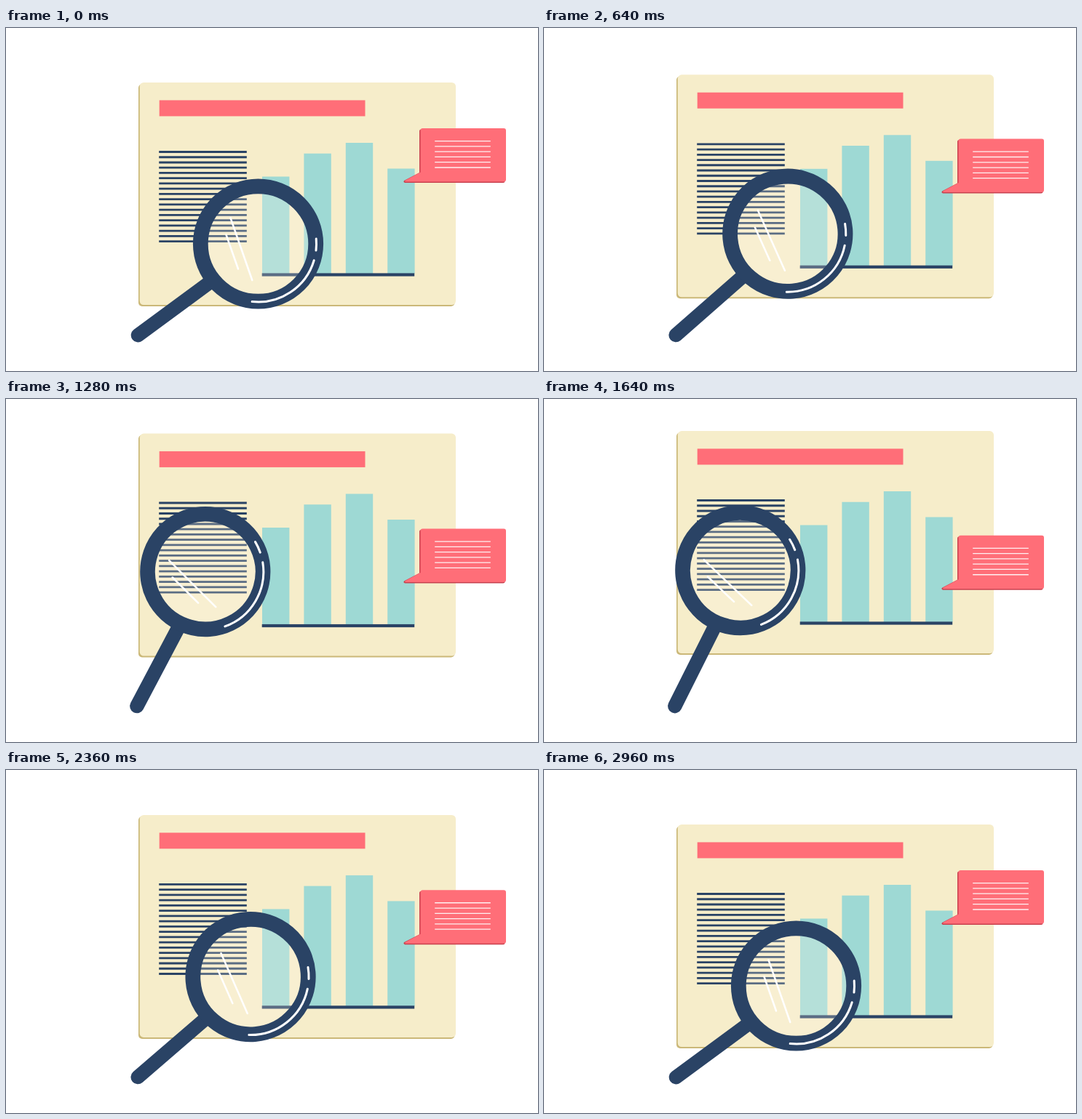
An HTML page that plays this animation: 731 px wide and 472 px high, repeating every 3000 ms.

```html
<!DOCTYPE html>
<html lang="en">
<head>
<meta charset="utf-8">
<title>Report under a magnifier</title>
<style>
  html, body { margin: 0; width: 100%; height: 100%; overflow: hidden; background: #fff; }
  svg { display: block; width: 731px; height: 472px; }
  .navy { fill: #2a4365; }
  .navy-line { fill: none; stroke: #2a4365; }
  .coral { fill: #ff6e78; }
  .teal { fill: #9ed9d4; }
  .shine { fill: none; stroke: #fff; stroke-linecap: round; }
</style>
</head>
<body>
<svg viewBox="0 0 731 472" xmlns="http://www.w3.org/2000/svg">
  <g id="board">
    <rect x="182" y="77.2" width="434.5" height="305.8" rx="5" fill="#cbb878"/>
    <rect x="183.7" y="75" width="434.3" height="306" rx="5.5" fill="#f6edca"/>
    <rect class="coral" x="210.7" y="99.4" width="282.8" height="22"/>
    <path id="text" class="navy-line" stroke-width="2.8"/>
    <g id="bars" class="teal"></g>
    <rect class="navy" x="351.7" y="337.4" width="209.5" height="4.2"/>
  </g>
  <g id="bubble">
    <path d="M568 142q0-2.5 2.5-2.5H683q2.500 0 2.500 2.500V210.500q0 2.500-2.500 2.500H548q-3-1.500-.5-3.300L568 199Z" fill="#c8404e"/>
    <path class="coral" d="M569.500 141q0-3 3-3H684q3 0 3 3V208.500q0 3-3 3H548.500q-1-1 .5-2L569.500 198.500Z"/>
    <path id="note" fill="none" stroke="#fff" stroke-opacity=".9" stroke-width="1.3"/>
  </g>
  <g id="lens">
    <circle cx="346.5" cy="297" r="70" fill="#fff4ea" fill-opacity=".23"/>
    <path class="navy-line" d="M181.400 422.700L281 349.300" stroke-width="19.400" stroke-linecap="round"/>
    <circle class="navy-line" cx="346.5" cy="297" r="79.200" stroke-width="20.800"/>
    <path id="glints" class="shine" stroke-width="3"/>
    <path class="shine" d="M308.500 261.500L338.300 347M302.500 284.500L319 331.500" stroke-width="2.500"/>
  </g>
</svg>
<script>
const LOOP = 3000, STEP = 40;
const PIVOT = '180.5 426';
const $ = id => document.getElementById(id);

const rules = (x1, x2, y, gap, count) =>
  Array.from({ length: count }, (_, i) => `M${x1} ${y + i * gap}H${x2}`).join('');

const arc = (from, to, r = 80, cx = 346.5, cy = 297) => {
  const at = deg => {
    const a = deg * Math.PI / 180;
    return `${cx + r * Math.cos(a)} ${cy + r * Math.sin(a)}`;
  };
  return `M${at(from)}A${r} ${r} 0 0 1 ${at(to)}`;
};

$('text').setAttribute('d', rules(210.2, 330.8, 170.5, 7.24, 18));
$('note').setAttribute('d', rules(589.2, 665.8, 155.6, 7.28, 6));
$('glints').setAttribute('d', arc(-5, 6.5) + arc(16.5, 96));
$('bars').innerHTML = [204.5, 172.7, 158, 193.5].map((y, i) =>
  `<rect x="${352 + i * 57.4}" y="${y}" width="37.4" height="${338 - y}"/>`).join('');

// Cubic Bezier easing with flat ends: handles (x1, 0) and (x2, 1)
function ease(u, x1, x2) {
  if (u <= 0) return 0;
  if (u >= 1) return 1;
  let lo = 0, hi = 1;
  for (let i = 0; i < 30; i++) {
    const s = (lo + hi) / 2, q = 1 - s;
    if (3 * q * q * s * x1 + 3 * q * s * s * x2 + s ** 3 < u) lo = s; else hi = s;
  }
  return lo * lo * (3 - 2 * lo);
}

// Goes out from start to peak and back by end, 0..1..0
function swing(t, start, peak, end, x1 = 1 / 3, x2 = 2 / 3) {
  const u = t < peak ? (peak - t) / (peak - start) : (t - peak) / (end - peak);
  return 1 - ease(u, x1, x2);
}

const place = (id, value) => $(id).setAttribute('transform', value);

function draw(t) {
  place('board', `translate(0 ${-31 * swing(t, 0, 1620, 2960)})`);
  place('bubble', `translate(0 ${51 * swing(t, 0, 1810, 2960)})`);
  place('lens', `rotate(${-28.4 * swing(t, 138, 1488, 2838, 0.3, 0.43)} ${PIVOT})`);
}

const began = performance.now();
function tick() {
  const t = (performance.now() - began) % LOOP;
  draw(Math.floor(t / STEP) * STEP);
  requestAnimationFrame(tick);
}
tick();
</script>
</body>
</html>
```
